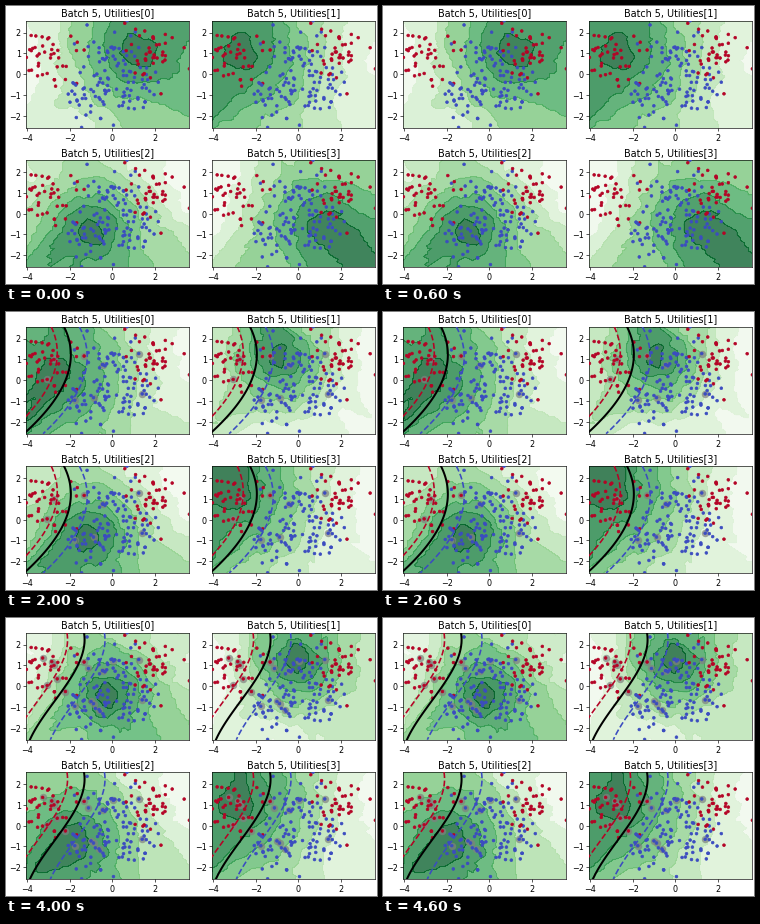
Animation, 371 px wide and 278 px high, one loop 5000 ms. Source, as a matplotlib script:

```python
import matplotlib.pyplot as plt
import numpy as np
from matplotlib.animation import FuncAnimation

W, H, DPI = 371.2, 278.4, 58
XLIM, YLIM = (-4.05, 3.61), (-2.57, 2.57)
PANEL_W, PANEL_H = 163, 107
CORNERS = [(x, y) for y in (15.1, 154.5) for x in (20.3, 206.3)]
RED, BLUE = "#b40426", "#3b4cc0"
NEIGHBORS = 5

# Five Gaussian blobs, alternating between the two classes
CENTERS = [(0, 1), (-3, .5), (-1, -1), (2, 1), (1, -.5)]
rng = np.random.RandomState(0)
X = np.concatenate([rng.normal(c, .7, (40, 2)) for c in CENTERS])
dot_colors = np.where(np.repeat(np.arange(5) % 2, 40) == 1, RED, BLUE)

# Utility peak of each panel, one row per step
PEAKS = np.array([
    [(1.28, 1.18), (-2.75, .95), (-1, -.9), (1.3, -.7)],
    [(-3.1, .1), (-1.2, 1.15), (-.45, .7), (-1.8, -.9)],
    [(-2.8, .25), (-.95, 1.05), (-1.15, -.87), (-3.2, 1.35)],
    [(.1, 1.1), (-2.3, -.4), (-.6, -.95), (-3, 1.15)],
    [(-.2, -.4), (0, 1.15), (-1.95, -.85), (-2.95, 1.05)],
])

# Boundary x at four heights from top to bottom, and its margin at top and bottom
BOUNDARIES = {
    1: [(-.97, -1.33, -2.7, -4.3), (.33, .6)],
    2: [(-2.28, -1.98, -2.66, -4.16), (.6, .75)],
    3: [(-1.39, -1.55, -2.49, -3.55), (.93, .8)],
    4: [(-1.34, -1.7, -2.82, -3.88), (.8, .8)],
}

gx, gy = np.meshgrid(np.linspace(*XLIM, 41), np.linspace(*YLIM, 41))


def distance(points, target):
    return np.hypot(points[..., 0] - target[..., 0], points[..., 1] - target[..., 1])


grid = np.stack([gx, gy], axis=-1)[:, :, None]
near = np.argsort(distance(grid, X), axis=2)[..., :NEIGHBORS]


def utility(peak):
    """Closeness of the samples to the peak, averaged over nearest neighbors."""
    return -distance(X, peak)[near].mean(axis=2)


def nearest(p):
    return X[np.argmin(distance(X, p))]


def draw_boundary(ax, xs, margin):
    heights = np.linspace(YLIM[1], YLIM[0], 4)
    y = np.linspace(YLIM[1], YLIM[0], 80)
    x = np.polyval(np.polyfit(heights, xs, 3), y)
    m = np.linspace(*margin, len(y))
    ax.plot(x, y, color="black", lw=2.5, zorder=4)
    ax.plot(x - m, y, color=RED, ls="--", lw=2, zorder=4)
    ax.plot(x + 1.2 * m, y, color=BLUE, ls="--", lw=2, zorder=4)


def draw_panel(ax, step, k):
    ax.clear()
    u = utility(PEAKS[step, k])
    fill = ax.contourf(gx, gy, u, cmap="Greens", alpha=.75)
    ax.contour(gx, gy, u, fill.levels, cmap="Greens", linewidths=.8, alpha=.85)
    picked = [nearest(p) for p in PEAKS[:step].reshape(-1, 2)]
    if picked:
        ax.scatter(*np.transpose(picked), s=85, c="gray", alpha=.7, lw=0, zorder=2.5)
    ax.scatter(*X.T, s=12, c=dot_colors, lw=.8, zorder=3)
    if step in BOUNDARIES:
        draw_boundary(ax, *BOUNDARIES[step])
    ax.set(xlim=XLIM, ylim=YLIM, xticks=range(-4, 3, 2), yticks=range(-2, 3))
    ax.set_title(f"Batch 5, Utilities[{k}]")


def update(step):
    for k, ax in enumerate(axes):
        draw_panel(ax, step, k)
    return []


fig = plt.figure(figsize=(W / DPI, H / DPI), dpi=DPI, facecolor="white")
axes = [fig.add_axes([x / W, 1 - (y + PANEL_H) / H, PANEL_W / W, PANEL_H / H])
        for x, y in CORNERS]

anim = FuncAnimation(fig, update, frames=len(PEAKS), interval=1000,
                     repeat=True, blit=False)
plt.show()
```
